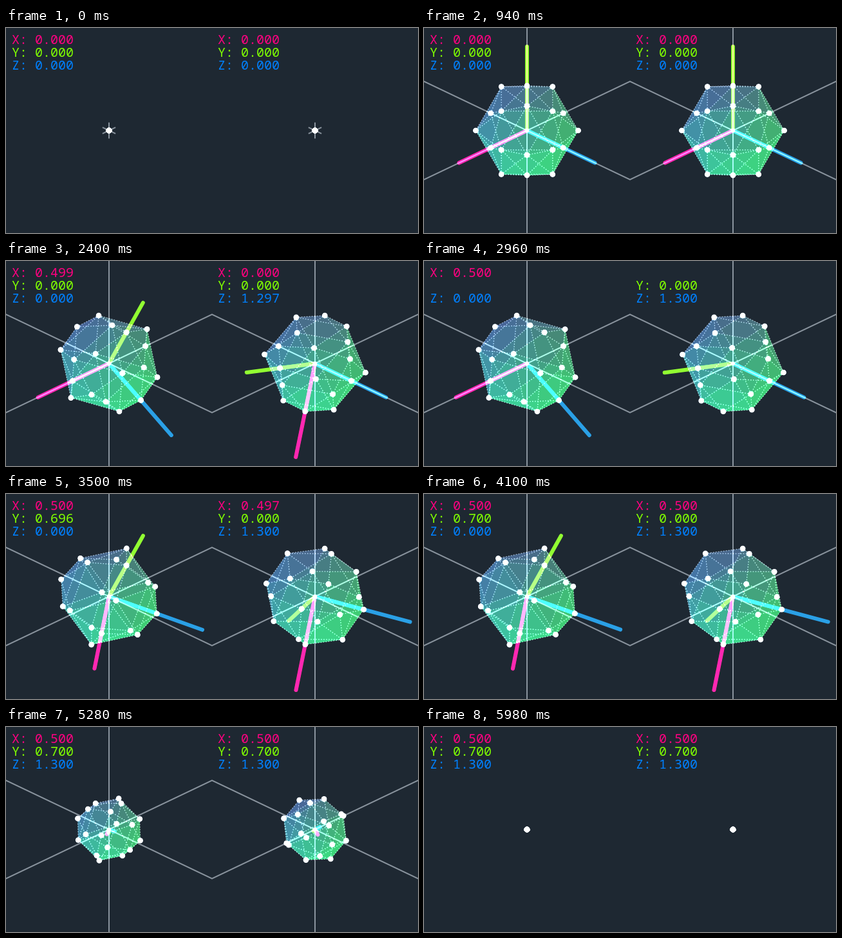
Write an HTML page with a canvas that moves like this. It is 640 by 320 pixels and loops after 6 s.

```html
<!DOCTYPE html>
<html lang="en">
<head>
<meta charset="utf-8">
<title>Rotation order</title>
<style>
  html, body { margin: 0; width: 640px; height: 320px; overflow: hidden; background: #1e2832; }
  canvas, svg { position: absolute; left: 0; top: 0; display: block; }
  text { font: 20px "Noto Sans Mono", "DejaVu Sans Mono", monospace; white-space: pre; }
</style>
</head>
<body>
<canvas id="stage" width="640" height="320"></canvas>
<svg id="labels" width="640" height="320"></svg>
<script>
const LOOP = 6000, TWEEN = 667, FIRST_TURN = 1815, TURN_GAP = 1183;
const BLINK_TIME = 500, BLINK_PERIOD = 100;
const RADIUS = 80, AXIS = 156, GUIDE = 300;
const NAMES = ["X", "Y", "Z"];
const COLORS = ["#ff0080", "#80ff00", "#0080ff"];
const AXIS_COLORS = ["#ff0080", "#74d800", "#0c78b4"];
const ANGLES = [0.5, 0.7, 1.3];
const TURN_PAIRS = [[1, 2], [0, 2], [1, 0]];
const UNIT = [[1, 0, 0], [0, 1, 0], [0, 0, 1]];
const TILT = 0.5, DIAG = Math.SQRT1_2;

const ctx = document.getElementById("stage").getContext("2d");
const svg = document.getElementById("labels");

// Octahedron subdivided once: axis points and edge midpoints on a sphere
const vertices = [];
for (let x = -1; x <= 1; x++)
  for (let y = -1; y <= 1; y++)
    for (let z = -1; z <= 1; z++) {
      const len = Math.hypot(x, y, z);
      if (len > 0.5 && len < 1.5) vertices.push([x / len, y / len, z / len]);
    }
const joined = (i, j) =>
  Math.hypot(...vertices[i].map((v, k) => v - vertices[j][k])) < 1.05;
const edges = [], faces = [];
vertices.forEach((_, i) => {
  for (let j = i + 1; j < vertices.length; j++) {
    if (!joined(i, j)) continue;
    edges.push([i, j]);
    for (let k = j + 1; k < vertices.length; k++)
      if (joined(i, k) && joined(j, k)) faces.push([i, j, k]);
  }
});

const clamp = p => Math.min(1, Math.max(0, p));
const expoOut = p => p <= 0 ? 0 : p >= 1 ? 1 : 1 - 2 ** (-10 * p);
const elasticOut = p => p <= 0 ? 0 : p >= 1 ? 1 :
  1 + 2 ** (-10 * p) * Math.sin((p - 0.075) * Math.PI * 2 / 0.3);
const tween = (t, start, ease = expoOut) => ease(clamp((t - start) / TWEEN));

// The axis flashes until its turn starts
const isBlinkedOff = wait =>
  wait > 0 && wait <= BLINK_TIME && wait % BLINK_PERIOD < BLINK_PERIOD / 2;

const combine = (a, u, b, v) => u.map((n, i) => a * n + b * v[i]);
const project = ([x, y, z]) => [
  (z - x) * DIAG,
  (x + z) * DIAG * Math.sin(TILT) - y * Math.cos(TILT)
];

function turn(basis, axis, angle) {
  const [p, q] = TURN_PAIRS[axis], c = Math.cos(angle), s = Math.sin(angle);
  const next = basis.slice();
  next[p] = combine(c, basis[p], s, basis[q]);
  next[q] = combine(c, basis[q], -s, basis[p]);
  return next;
}

function line(a, b) {
  ctx.moveTo(...a);
  ctx.lineTo(...b);
}

function makePane(left, order) {
  const texts = NAMES.map((_, i) => {
    const el = document.createElementNS("http://www.w3.org/2000/svg", "text");
    el.setAttribute("x", left + 9);
    el.setAttribute("y", 25 + 20 * i);
    el.setAttribute("fill", COLORS[i]);
    return svg.appendChild(el);
  });
  return { left, order, texts };
}

function drawGuides(length) {
  ctx.strokeStyle = "rgba(255,255,255,.42)";
  ctx.lineWidth = 2;
  ctx.beginPath();
  for (const dir of UNIT) {
    const [x, y] = project(dir).map(n => n * length);
    line([-x, -y], [x, y]);
  }
  ctx.stroke();
}

function drawSolid(unitPoints, scale) {
  const points = unitPoints.map(p => p.map(n => n * RADIUS * scale));
  if (scale > 0.01) {
    for (const face of faces) {
      const [u, v] = [0, 1].map(k => face.reduce((sum, i) => sum + unitPoints[i][k], 0) / 3);
      ctx.fillStyle = `rgb(${18 - 4 * v},${60 + 10 * u + 34 * v},${45 - 18 * u + 2 * v})`;
      ctx.beginPath();
      face.forEach(i => ctx.lineTo(...points[i]));
      ctx.fill();
    }
    ctx.strokeStyle = "rgba(255,255,255,.45)";
    ctx.lineWidth = 1.3;
    ctx.setLineDash([1.6, 2.4]);
    ctx.beginPath();
    for (const [i, j] of edges) line(points[i], points[j]);
    ctx.stroke();
    ctx.setLineDash([]);
  }
  return points;
}

function drawAxes(basis, hidden, scale) {
  if (scale < 0.005) return;
  ctx.lineWidth = 6;
  ctx.lineCap = "round";
  basis.forEach((dir, i) => {
    if (hidden === i) return;
    ctx.strokeStyle = AXIS_COLORS[i];
    ctx.beginPath();
    line([0, 0], project(dir).map(n => n * AXIS * scale));
    ctx.stroke();
  });
  ctx.lineCap = "butt";
}

function drawPane({ left, order, texts }, t) {
  let basis = UNIT, hidden = -1;
  const values = [0, 0, 0];
  order.forEach((axis, step) => {
    const start = FIRST_TURN + step * TURN_GAP;
    values[axis] = ANGLES[axis] * tween(t, start);
    basis = turn(basis, axis, values[axis]);
    if (isBlinkedOff(start - t)) hidden = axis;
  });
  const solid = tween(t, 505, elasticOut) * (1 - tween(t, 5240));
  const axes = tween(t, 640) * (1 - tween(t, 5010));
  const guides = tween(t, -3.7) * (1 - tween(t, 5455));
  const unitPoints = vertices.map(([x, y, z]) =>
    project(combine(1, combine(x, basis[0], y, basis[1]), z, basis[2])));

  ctx.save();
  ctx.beginPath();
  ctx.rect(left, 0, 320, 320);
  ctx.clip();
  ctx.translate(left + 160, 160);
  ctx.globalCompositeOperation = "lighter";
  drawGuides(GUIDE * guides);
  const points = drawSolid(unitPoints, solid);
  drawAxes(basis, hidden, axes);
  ctx.fillStyle = "#fff";
  for (const [x, y] of points) {
    ctx.beginPath();
    ctx.arc(x, y, 4.3, 0, Math.PI * 2);
    ctx.fill();
  }
  ctx.restore();

  texts.forEach((el, i) => {
    el.textContent = hidden === i ? "" : `${NAMES[i]}: ${values[i].toFixed(3)}`;
  });
}

const panes = [makePane(0, [0, 1, 2]), makePane(320, [2, 0, 1])];
const begin = performance.now();

function render() {
  const t = Math.max(0, performance.now() - begin) % LOOP;
  ctx.fillStyle = "#1e2832";
  ctx.fillRect(0, 0, 640, 320);
  panes.forEach(pane => drawPane(pane, t));
  requestAnimationFrame(render);
}
render();
</script>
</body>
</html>
```
